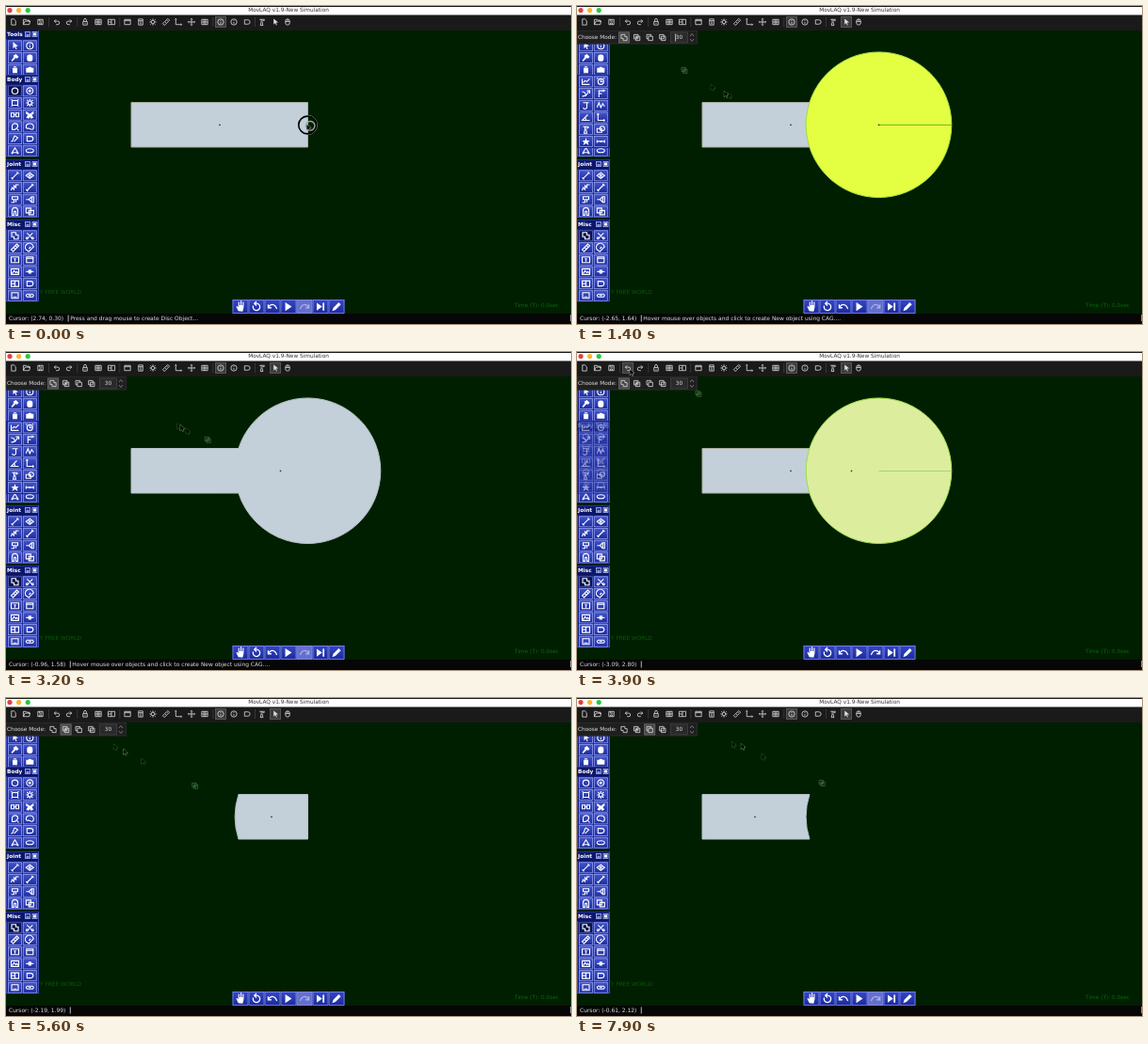
Animation, 600 px wide and 338 px high, one loop 8000 ms. Source, as an HTML page with a canvas:

```html
<!DOCTYPE html>
<html lang="en">
<head>
<meta charset="utf-8">
<title>Simulation</title>
<style>
html, body { margin: 0; width: 600px; height: 338px; overflow: hidden; background: #001f00; }
canvas { display: block; }
</style>
</head>
<body>
<canvas id="stage" width="600" height="338"></canvas>
<script>
const c = document.getElementById('stage').getContext('2d');
const LOOP = 8000, STEP = 100;
const FONT = '"DejaVu Sans", sans-serif';
const L = 133, R = 320.5, T = 102.5, B = 150;
const CX = 320.5, CY = 126.25, RAD = 77.3, A = Math.asin((B - T) / 2 / RAD);

// Icons centred on 0,0; a leading "!" means filled.
const icons = {
  arrow: '!M-2-4v7l2-2 1 3 1-.5-1-3h2.5z',
  info: 'M3.5 0a3.5 3.5 0 1 1-7 0a3.5 3.5 0 1 1 7 0M0-2v1M0 0v2',
  hammer: '!M-4 3l3-4-1-1 3-2 3 3-2 2-1-1-4 4z',
  mouse: '!M-3-1a3 2.5 0 0 1 6 0v2.5a3 2.5 0 0 1-6 0z',
  mouseLine: 'M-2.5-1a2.5 2.5 0 0 1 5 0v2a2.5 2.5 0 0 1-5 0zM-2.5-.5h5M0-3.5v3',
  trash: '!M-2.5-2h5v5.5h-5zM-1.5-3.5h3v1h-3z',
  camera: '!M-4-2h2l1-1h2l1 1h2v5h-8z',
  graph: 'M-4-3v6h8M-3 1l2-2 2 1 3-3',
  clock: 'M3 0a3 3 0 1 1-6 0a3 3 0 1 1 6 0M0-2v2h2M-4-3l1-1M4-3l-1-1',
  tracer: 'M-4-2l3 1 1 3 3-4M-4 3l4-1M1-3h3v3',
  force: 'M-2 4v-7h4M-2 0h3M2-4l2 1-2 1',
  torque: 'M-3-3h6M1-3v4a2 2 0 0 1-4 1',
  wave: 'M-4 2l2-5 2 5 2-4 2 3',
  angle: 'M4 3h-8l6-6M0 3a4 4 0 0 0-1-3',
  axis: 'M-3-4v7h7M-4-3l1-1 1 1M3 2l1 1-1 1',
  beaker: 'M-3-3h6M-1-3v3l-1 4h3l-1-4M0-1l3-1',
  shapes: 'M-4-1h5v4h-5zM4-1a2.5 2.5 0 1 1-5 0a2.5 2.5 0 1 1 5 0',
  star: '!M0-4l1 3h3l-2 2 1 3-3-2-3 2 1-3-2-2h3z',
  dots: 'M-4 0h8M-4-1.5v3M0-1v2M4-1.5v3',
  disc: 'M3.2 0a3.2 3.2 0 1 1-6.4 0a3.2 3.2 0 1 1 6.4 0',
  ring: 'M3.4 0a3.4 3.4 0 1 1-6.8 0a3.4 3.4 0 1 1 6.8 0M1 0a1 1 0 1 1-2 0a1 1 0 1 1 2 0',
  square: 'M-3-2.5h6v5h-6zM-4-3.5h1M3-3.5h1M-4 3.5h1M3 3.5h1',
  gear: 'M2 0a2 2 0 1 1-4 0a2 2 0 1 1 4 0M0-4v2M0 2v2M-4 0h2M2 0h2M-3-3l1 1M3-3l-1 1M-3 3l1-1M3 3l-1-1',
  blocks: 'M-4-2h3v4h-3zM1-2h3v4h-3zM-1 0h2',
  moth: '!M0-1l-4-3v3l2 1-2 3 3 1 1-2 1 2 3-1-2-3 2-1v-3z',
  arc: 'M-3 3v-4a3 3 0 0 1 6 1l-3 3zM2 2l2 2',
  blob: 'M-4 0c0-5 8-4 8 0s-3 3-4 2-4 1-4-2',
  curve: 'M-4 3c3 0 2-6 4-6l3 2-4 4',
  dee: 'M-3-2.5h4a2.5 2.5 0 0 1 0 5h-4z',
  tri: 'M0-3l3 5h-6zM-4 3h2M2 3h2',
  oval: 'M4 0a4 2 0 1 1-8 0a4 2 0 1 1 8 0',
  rod: 'M-3 3l6-6M-4 2l2 2M2-4l2 2',
  hinge: 'M-4 0l4-3 4 3-4 3zM1 0a1 1 0 1 1-2 0a1 1 0 1 1 2 0',
  spring: 'M-4 3l1-3 2 2v-4l2 2v-3l3 0',
  motor: 'M-3-3h6v3h-6zM-1 0v3h-3M1 0v3',
  pair: 'M-4 0h3l3-3M-1 0l3 3M2-3h2v6h-2z',
  arch: 'M-3 4v-5a3 3 0 0 1 6 0v5h-2v-4h-2v4z',
  copy: 'M-4-3.5h5v5h-5zM-1-1h5v4.5h-5z',
  union: 'M-3.5-3.5h4.5v2.5h2.5v4.5h-4.5v-2.5h-2.5z',
  cut: 'M-3-3l5 5M3-3l-5 5M-2 2.5a1 1 0 1 1-2 0a1 1 0 1 1 2 0M4 2.5a1 1 0 1 1-2 0a1 1 0 1 1 2 0',
  ruler: 'M-4 2l6-6 2 2-6 6zM-1 0l1 1M1-2l1 1',
  protractor: 'M-4 2a4 4 0 0 1 7-5l1 2-5 5zM-1 1l2-2',
  text: 'M-4-3h8v6h-8zM-1-1h2M0-1v3',
  window: 'M-3.5-3h7v6h-7zM-3.5-1.5h7',
  image: 'M-4-3h8v6h-8zM-3 2l2-3 2 2 1-1 2 2',
  slider: 'M-4 0h8M-1-1.5h2v3h-2z',
  panel: 'M-4-3h8v6h-8zM0-3v6M-4 0h4',
  picture: 'M-3.5-3h7v6h-7zM-2 1.5h4',
  link: 'M-4 0l1-1.5h6l1 1.5-1 1.5h-6zM-1.5 0h3',
  page: 'M-2.5-3.5h3l2 2v5h-5z',
  folder: 'M-4 3v-6h3l1 1h3v2M-4 3l2-4h6l-1 4z',
  save: 'M-3-3h6v6h-6zM-1-3v2h3M-1 3v-2h2v2',
  undo: 'M-3-1h4a2 2 0 0 1 0 4h-2M-1-3l-2 2 2 2',
  redo: 'M3-1h-4a2 2 0 0 0 0 4h2M1-3l2 2-2 2',
  lock: 'M-2.5-.5h5v4h-5zM-1.5-.5v-2a1.5 1.5 0 0 1 3 0v2M0 1v1',
  grid: 'M-3.5-3h7v6h-7zM-3.5 0h7M-1-3v6M1-3v6',
  calc: 'M-2.5-3.5h5v7h-5zM-2.5-1.5h5M-1 0h2M-1 2h2',
  move: 'M-4 0h8M0-4v8M-3-1l-1 1 1 1M3-1l1 1-1 1M-1-3l1-1 1 1M-1 3l1 1 1-1',
  hand: '!M-2 4l-2-4 1-.5 1 1v-5h1v3h1v-4h1v4h1v-3h1v5l-1 4z',
  reset: 'M-3-1a3.2 3.2 0 1 0 3-2h-2M0-5l-2 2 2 2',
  back: 'M-4 1c2-4 6-4 8 1M-4-2v3h3',
  ahead: 'M4 1c-2-4-6-4-8 1M4-2v3h-3',
  play: '!M-3-4l6 4-6 4z',
  step: '!M-3.5-3.5l5 3.5-5 3.5zM2-3.5h1.5v7h-1.5z',
  pencil: '!M-4 4l1-3 5-5 2 2-5 5z',
  meet: 'M-3.5-3.5h5v5h-5zM-1.5-1.5h5v5h-5zM-1 0h2M0-1v2',
  minus: 'M1.5-1.5v-2h-5v5h2M-1.5-1.5h5v5h-5z',
  either: 'M-3.5-3.5h5v5h-5zM-1.5-1.5h5v5h-5z'
};
for (const k in icons) {
  const s = icons[k], fill = s[0] === '!';
  icons[k] = { fill, path: new Path2D(fill ? s.slice(1) : s) };
}
const list = s => s.split(' ');
const tools = list('arrow info hammer mouse trash camera');
const moreTools = list('graph clock tracer force torque wave angle axis beaker shapes star dots');
const body = list('disc ring square gear blocks moth arc blob curve dee tri oval');
const joint = list('rod hinge spring rod motor pair arch copy');
const misc = list('union cut ruler protractor text window image slider panel dee picture link');
const playbar = list('hand reset back play ahead step pencil');
const modes = list('union meet minus either');
const topbar = [['page', 8], ['folder', 22], ['save', 36.5], ['undo', 54], ['redo', 67], ['lock', 84],
  ['grid', 98], ['panel', 112], ['window', 129], ['calc', 143], ['gear', 156], ['ruler', 170],
  ['axis', 183], ['move', 197], ['grid', 211], ['info', 228], ['info', 242], ['dee', 256],
  ['beaker', 272], ['arrow', 286], ['mouseLine', 299]];

// Pointer path: time, x, y
const path = [[0, 320.16, 127.3], [200, 320.16, 127.3], [700, 397.8, 126.5], [1000, 10, 244],
  [1100, 10, 244], [1200, 58, 38], [1300, 107, 66.4], [1400, 157, 92], [1700, 235, 121],
  [2000, 262, 126], [2400, 271.2, 128], [2800, 271.2, 128], [3500, 121.9, 42.3], [3600, 121.9, 42.3],
  [3800, 57, 20], [4000, 57, 20], [4300, 63, 34], [4450, 63, 34], [4700, 248.6, 123.1],
  [4800, 250, 125], [5100, 262, 127], [5400, 262, 127], [5700, 57, 20], [5850, 57, 20],
  [6000, 77, 34], [6100, 77, 34], [6300, 300.65, 127.5], [6400, 302, 130], [6800, 290, 128],
  [7300, 290, 128], [7700, 278, 104], [7800, 253.2, 88.5], [7900, 175, 50], [8000, 110, 36]];
const clicks = [[0, 700], [1000, 1100], [2500, 2700], [5100, 5300], [6800, 7000]];
const within = (t, a, b) => t >= a && t < b;

function pointer(t) {
  t = Math.max(0, Math.min(LOOP, t));
  const i = Math.max(1, path.findIndex(p => p[0] >= t));
  const [t0, x0, y0] = path[i - 1], [t1, x1, y1] = path[i], k = (t - t0) / (t1 - t0);
  return [x0 + (x1 - x0) * k, y0 + (y1 - y0) * k];
}
const onCanvas = ([x, y]) => x > 36 && y > 41;
function lastOnCanvas(t) {
  while (t > 0 && !onCanvas(pointer(t))) t -= STEP;
  return pointer(t);
}

function box(x, y, w, h, fill, line) {
  c.fillStyle = fill;
  c.fillRect(x, y, w, h);
  if (line) {
    c.strokeStyle = line;
    c.lineWidth = .8;
    c.strokeRect(x + .5, y + .5, w - 1, h - 1);
  }
}
function text(s, x, y, color = '#ddd', align = 'left', font = '5.8px ') {
  c.font = font + FONT;
  c.textAlign = align;
  c.textBaseline = 'middle';
  c.fillStyle = color;
  c.fillText(s, x, y);
}
function icon(name, x, y, color = '#fff', size = 1, weight = .9) {
  const { fill, path } = icons[name];
  c.save();
  c.translate(x, y);
  c.scale(size, size);
  c.fillStyle = c.strokeStyle = color;
  c.lineWidth = weight;
  fill ? c.fill(path) : c.stroke(path);
  c.restore();
}
function gloss(y, h, top, bottom) {
  const g = c.createLinearGradient(0, y, 0, y + h);
  g.addColorStop(0, top);
  g.addColorStop(1, bottom);
  return g;
}
function button(name, x, y, dark) {
  const fill = dark ? '#0a1450' : gloss(y - 6, 12, '#4456cc', '#1b2a9c');
  box(x - 7.5, y - 6, 15, 12, fill, dark ? '#5a68c0' : '#8f9bea');
  icon(name, x, y, '#fff', 1, 1.1);
}
function rows(names, y, darkFirst) {
  names.forEach((n, i) => button(n, i % 2 ? 25.3 : 9.5, y + (i >> 1) * 12.7, darkFirst && !i));
}
function panel(title, y, names, darkFirst) {
  const h = names.length / 2 * 12.7 + 11;
  box(0, y - 5, 35, h, '#18258a', '#4a59c4');
  box(0, y - 4.5, 34, 10, '#0c1768');
  text(title, 1, y, '#fff', 'left', 'bold 5.8px ');
  box(20, y - 3, 6, 6, '#25339a', '#aab4ee');
  box(27.5, y - 3, 6, 6, '#25339a', '#aab4ee');
  box(21.5, y + .5, 3, 1, '#fff');
  box(29, y - 1.5, 3, 3, '#fff');
  rows(names, y + 12.3, darkFirst);
}
const dot = x => box(x - .7, 125.7, 1.4, 1.4, '#223');
function shape(draw, fill, line, dotX) {
  c.beginPath();
  draw();
  c.closePath();
  c.fillStyle = fill;
  c.strokeStyle = line;
  c.lineWidth = 1;
  c.fill();
  c.stroke();
  if (dotX) dot(dotX);
}

const bar = () => c.rect(L, T, R - L, B - T);
const union = () => {
  c.moveTo(L, T);
  c.arc(CX, CY, RAD, Math.PI + A, 3 * Math.PI - A);
  c.lineTo(L, B);
};
const lens = () => {
  c.arc(CX, CY, RAD, Math.PI + A, Math.PI - A, true);
  c.lineTo(R, B);
  c.lineTo(R, T);
};
const notched = () => {
  c.moveTo(L, T);
  c.arc(CX, CY, RAD, Math.PI + A, Math.PI - A, true);
  c.lineTo(L, B);
};
const GREY = '#c3d0da', EDGE = '#a9aaa0', PALE = '#dee8e7', SOFT = '#b3c2c4';

function disc(r, fading) {
  if (r < 3) return;
  shape(() => c.arc(CX, CY, r, 0, 7), fading ? '#dcee9e' : '#e4ff41', '#9edb48');
  box(CX, 126, r, .9, fading ? '#a5cf78' : '#5fb51f');
  dot(fading ? 291.5 : CX);
}
function scene(t) {
  if (within(t, 2200, 3800)) {
    const hover = t < 2700;
    shape(union, hover ? PALE : GREY, hover ? '#efffd8' : SOFT, 291.5);
  } else if (within(t, 5200, 5700)) {
    shape(lens, GREY, SOFT, 282);
  } else if (t >= 6900) {
    shape(notched, GREY, SOFT, 189);
  } else {
    shape(bar, GREY, EDGE, 227);
    disc(t < 800 ? Math.min(RAD, pointer(t)[0] - 320.16) : RAD, within(t, 3800, 4000));
    if (within(t, 4700, 5200)) shape(lens, PALE, '#fff', 282);
    if (within(t, 6300, 6900)) shape(notched, PALE, '#fff', 189);
  }
}
function palettes(t) {
  panel('Tools', 30, tools);
  panel('Body', 78, body, t < 1100);
  if (within(t, 1100, 4100)) {
    c.save();
    c.globalAlpha = t < 3700 ? 1 : .5;
    box(0, 73, 35, 78, '#18258a');
    rows(moreTools, 80.4);
    c.restore();
  }
  panel('Joint', 168, joint);
  panel('Misc', 232, misc, t >= 1100);
}
function statusBar(t) {
  const size = '5.95px ', [x, y] = lastOnCanvas(t - 40);
  const readout = `Cursor: (${((x - 227) / 34).toFixed(2)}, ${((137.5 - y) / 34).toFixed(2)})`;
  box(0, 327, 600, 11, '#060606');
  text(readout, 3, 332, '#ddd', 'left', size);
  const end = 7.5 + c.measureText(readout).width;
  box(end, 328.5, .9, 7, '#ccc');
  box(599, 328, 1, 7, '#888');
  const message = t < 1100 ? 'Press and drag mouse to create Disc Object...'
    : t < 3700 ? 'Hover mouse over objects and click to create New object using CAG....' : '';
  text(message, end + 2.5, 332, '#ddd', 'left', size);
}
function bars(t) {
  box(0, 0, 600, 26, '#1a1a1a');
  box(0, 1, 600, 8.5, '#fff');
  ['#e2403f', '#fdb52c', '#29c840'].forEach((color, i) => {
    c.fillStyle = color;
    c.beginPath();
    c.arc(4 + i * 9.6, 4.6, 2.6, 0, 7);
    c.fill();
  });
  text('MovLAQ v1.9-New Simulation', 300, 4.8, '#333', 'center');
  const undoing = within(t, 3800, 4100) || within(t, 5700, 5900);
  topbar.forEach(([name, x]) => {
    const on = x === 228 || x === 286 && t >= 1100 || x === 54 && undoing;
    if (on) box(x - 6, 11, 12, 12, '#3c3c3c', '#5c5c5c');
    icon(name, x, 17, '#ddd', .9);
  });
  [45, 75.5, 120.5, 219.5, 264].forEach(x => box(x, 12, .7, 10, '#444'));

  if (t >= 1100) {
    box(0, 26, 128, 14.5, '#1f1f1f', '#2c2c2c');
    text('Choose Mode:', 1, 33.5);
    const mode = t < 4300 ? 0 : t < 6000 ? 1 : 2;
    modes.forEach((name, i) => {
      const x = 50 + i * 13.6;
      if (i === mode) box(x - 6, 27.5, 12, 12, '#484848', '#686868');
      icon(name, x, 33.5, '#ddd', .9);
    });
    box(99, 27.5, 19, 12, '#2a2a2a', '#404040');
    text('30', 108.5, 33.5, '#ddd', 'center');
    if (t < 1600) box(104.3, 29.5, .8, 8, '#ddd');
    c.strokeStyle = '#888';
    c.stroke(new Path2D('M120 32l2-2.5 2 2.5M120 35l2 2.5 2-2.5'));
  }

  const canRedo = within(t, 3800, 5200) || within(t, 5700, 6900);
  playbar.forEach((name, i) => {
    const x = 240.5 + i * 17, off = name === 'ahead' && !canRedo;
    box(x, 312, 17, 15, off ? '#6570cc' : gloss(312, 15, '#3548c4', '#1b2a9c'), '#7f8be2');
    icon(name, x + 8.5, 319.6, off ? '#a7b0ea' : '#fff', 1.15, 1.1);
  });
  statusBar(t);
}
function arrow([x, y], fill, line) {
  c.save();
  c.translate(x + 1, y + 2);
  c.scale(.85, .85);
  c.strokeStyle = line;
  c.lineWidth = 1;
  c.stroke(icons.arrow.path);
  c.restore();
  icon('arrow', x + 1, y + 2, fill, .85);
}
function cursor(t) {
  const here = pointer(t), [x, y] = here, [px, py] = pointer(t - 28);
  const fast = Math.hypot(x - px, y - py) > 5 && onCanvas(here);
  if (clicks.some(([a, b]) => within(t, a, b))) {
    for (const [r, weight, color] of [[10.3, .7, '#bbb'], [9.4, 1.6, '#000']]) {
      c.beginPath();
      c.arc(x, y - .8, r, 0, 7);
      c.lineWidth = weight;
      c.strokeStyle = color;
      c.stroke();
    }
  }
  if (t < 700) icon('disc', x + 3, y, '#9aa', 1.5);
  if (t > 1200) {
    // The mode badge trails behind the arrow and stays where the pointer left the canvas.
    const [bx, by] = lastOnCanvas(t - STEP);
    icon('meet', bx + 7, by + 2, '#4d844d', .85, .7);
  }
  if (fast) {
    arrow([px, py], '#001200', '#2f6a2f');
    arrow(pointer(t + 15), '#001200', '#2f6a2f');
  }
  arrow(here, '#000', fast ? '#7fa87f' : '#ccc');
}
function draw(t) {
  box(0, 0, 600, 338, '#001f00');
  text('GRAVITY FREE WORLD', 80, 304, '#0b560b', 'right');
  text('Time (T): 0.0sec', 587, 318.5, '#0d650d', 'right');
  scene(t);
  palettes(t);
  bars(t);
  cursor(t);
}
let start, last = -1;
function frame(now) {
  start ??= now;
  const t = Math.floor((now - start) % LOOP / STEP) * STEP;
  if (t !== last) draw(last = t);
  requestAnimationFrame(frame);
}
requestAnimationFrame(frame);
</script>
</body>
</html>
```
